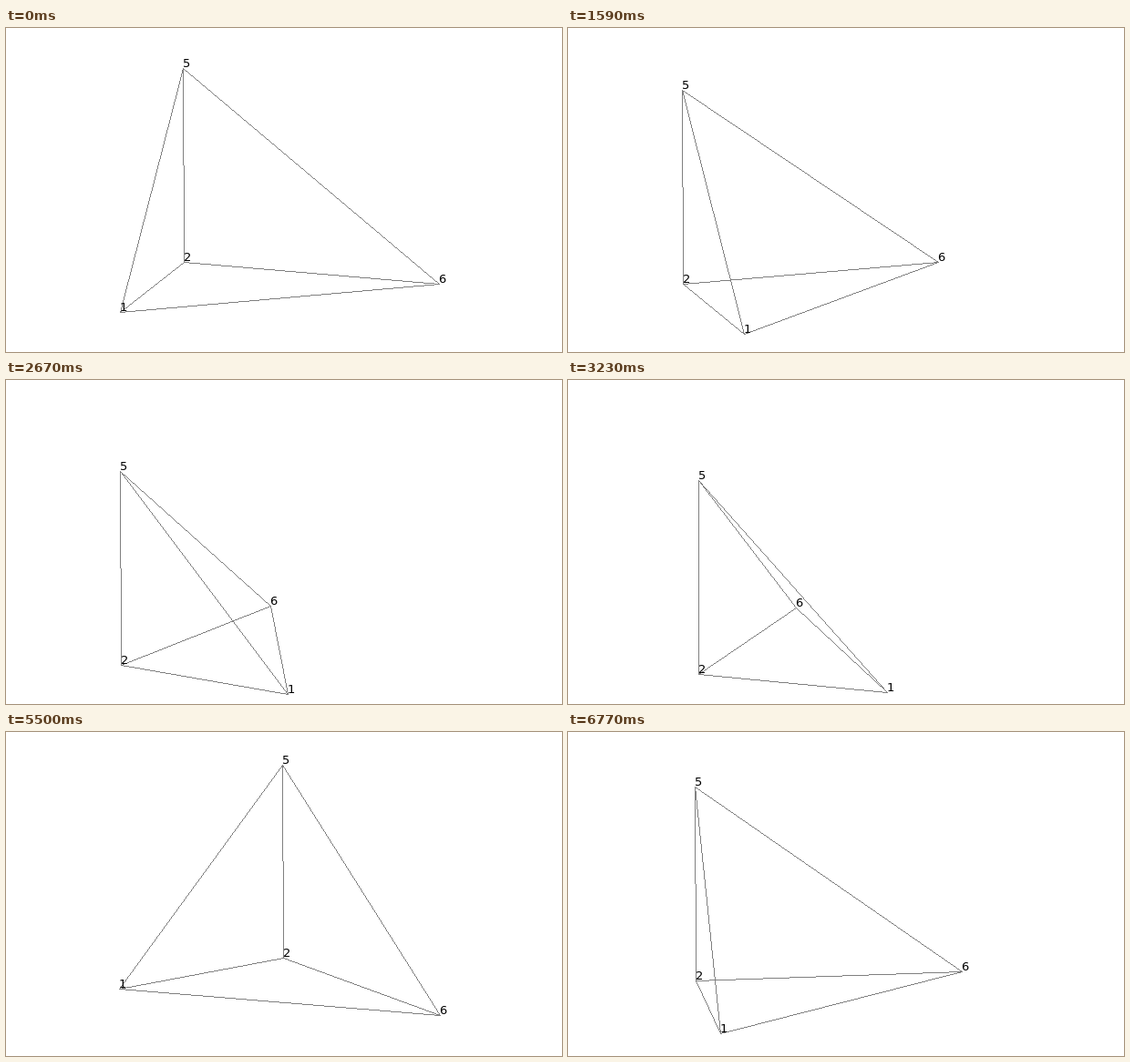
Write an HTML page with a canvas that moves like this. It is 610x356 px and loops after 7.97 s.

```html
<!DOCTYPE html>
<html lang="en">
<head>
<meta charset="utf-8">
<title>Rotating tetrahedron</title>
<style>
  html, body { margin: 0; width: 100%; height: 100%; overflow: hidden; background: #fff; }
  canvas { display: block; }
</style>
</head>
<body>
<canvas id="stage" width="610" height="356"></canvas>
<script>
const ctx = document.getElementById('stage').getContext('2d');
const LOOP = 7970;
const CENTER = { x: 299.8, y: 296.8 };
const RADIUS = { x: 184.4, y: 48.5 };
const HEIGHT = 212.8;

// Bursts of movement: first change, last change, number of changes.
const BURSTS = [
  [240, 1030, 18], [1070, 1860, 20], [1900, 2670, 19], [2720, 2800, 3],
  [2980, 3230, 7], [4870, 5630, 17], [5670, 6310, 15], [6480, 6770, 8]
];

// Turn of the solid in degrees: [ms, angle]; the second track starts with a jump.
const TRACKS = [
  [[0, -34.8], [200, -34.8], [1030, -51.9], [1860, -82.3], [2220, -95.6],
   [2670, -109.2], [2800, -112], [2940, -112], [3230, -122]],
  [[4870, 64.2], [5500, 0], [5630, -12.5], [6310, -76.5], [6440, -76.5], [6770, -60.3]]
];

const EDGES = ['51', '52', '56', '21', '26', '16'];

// Time of the latest picture change.
function snap(t) {
  let last = 0;
  for (const [start, end, count] of BURSTS) {
    if (t < start) break;
    const step = (end - start) / (count - 1);
    const i = Math.min(count - 1, Math.floor((t - start) / step + 1e-6));
    last = start + i * step;
  }
  return last;
}

const slope = (a, b) => (b[1] - a[1]) / (b[0] - a[0]);

function tangent(keys, i) {
  if (i === 0) return slope(keys[0], keys[1]);
  if (i === keys.length - 1) return slope(keys[i - 1], keys[i]);
  const m = slope(keys[i - 1], keys[i]);
  const n = slope(keys[i], keys[i + 1]);
  return m * n > 0 ? 2 * m * n / (m + n) : 0;
}

// Monotone cubic through the keys of the active track.
function angleAt(t) {
  const keys = t < TRACKS[1][0][0] ? TRACKS[0] : TRACKS[1];
  const i = keys.findIndex(key => key[0] > t) - 1;
  if (i < 0) return keys[keys.length - 1][1];
  const [t0, a0] = keys[i];
  const [t1, a1] = keys[i + 1];
  const d = t1 - t0;
  const u = (t - t0) / d;
  const v = 1 - u;
  return a0 * (1 + 2 * u) * v * v + a1 * u * u * (3 - 2 * u) +
    d * u * v * (tangent(keys, i) * v - tangent(keys, i + 1) * u);
}

function project(deg, lift = 0) {
  const a = deg * Math.PI / 180;
  return {
    x: Math.round(CENTER.x + RADIUS.x * Math.sin(a) - (lift ? 0.6 : 0)),
    y: Math.round(CENTER.y - RADIUS.y * Math.cos(a) - lift)
  };
}

// One-pixel line without smoothing.
function line(p, q) {
  const dx = q.x - p.x;
  const dy = q.y - p.y;
  const n = Math.max(Math.abs(dx), Math.abs(dy), 1);
  for (let i = 0; i <= n; i++) {
    ctx.fillRect(Math.round(p.x + dx * i / n), Math.round(p.y + dy * i / n), 1, 1);
  }
}

function draw(t) {
  const a = angleAt(snap(t));
  const points = {
    1: project(a - 73.8),
    2: project(a),
    5: project(a, HEIGHT),
    6: project(a + 106.2)
  };
  ctx.fillStyle = '#fff';
  ctx.fillRect(0, 0, 610, 356);
  ctx.fillStyle = '#808080';
  for (const [p, q] of EDGES) line(points[p], points[q]);
  ctx.fillStyle = '#000';
  ctx.font = '13px "DejaVu Sans", sans-serif';
  for (const name in points) ctx.fillText(name, points[name].x, points[name].y - 1);
}

const begin = performance.now();
function tick() {
  draw((performance.now() - begin) % LOOP);
  requestAnimationFrame(tick);
}
tick();
</script>
</body>
</html>
```
